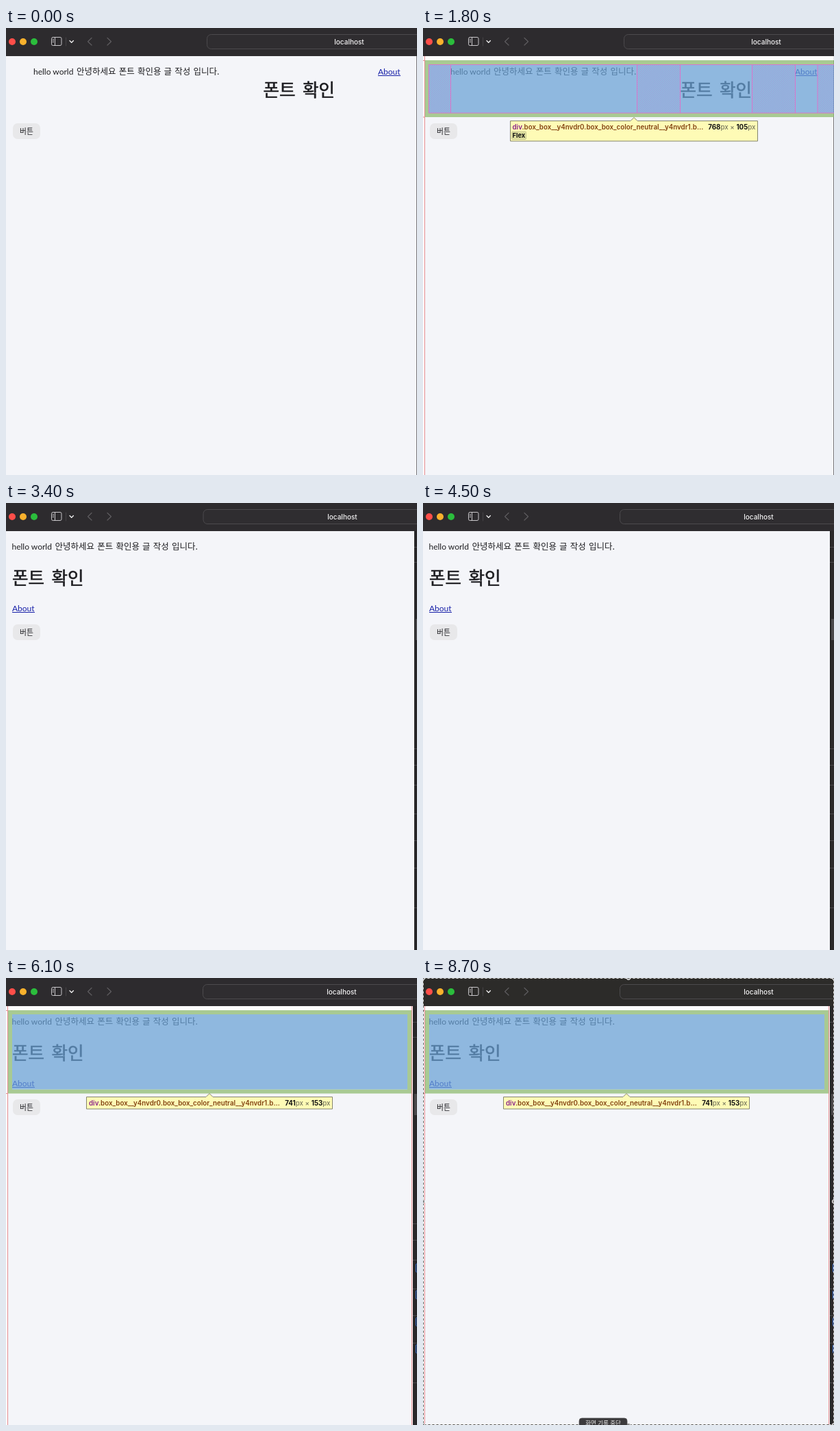
These frames come from a looping animation (600 by 652 pixels, 9 s). An HTML page:

```html
<!DOCTYPE html>
<html lang="ko">
<head>
<meta charset="utf-8">
<title>Responsive layout inspection</title>
<style>
  html, body { margin: 0; width: 100%; height: 100%; overflow: hidden; background: #f4f5f9; }
  svg { display: block; }
  .latin { font: 12px Lato, sans-serif; fill: #1d1d20; }
  .korean { font: 12.5px "Noto Sans CJK KR", "Noto Sans CJK", sans-serif; fill: #1d1d20; word-spacing: .7px; }
  .heading { font-size: 25.6px; stroke: #1d1d20; stroke-width: .6; }
  .small { font-size: 10.8px; }
  .link { fill: #1720a8; }
  .tip { font: 600 9.75px Inter, sans-serif; fill: #82400f; }
  .size { font-weight: 500; fill: #77775e; }
  .size tspan, .badge { font-weight: 700; fill: #111; }
  .badge { font-size: 9.3px; }
  .tag { fill: #8a2088; }
  .content { fill: rgb(104, 161, 214); fill-opacity: .72; }
  .padding { fill: rgb(143, 189, 114); fill-opacity: .75; }
  .margin { fill: #fff; fill-opacity: .8; }
  .guide { fill: none; stroke: #e58b90; }
  .bubble { fill: #fefbb6; stroke: #85856e; }
</style>
</head>
<body>
<svg width="600" height="652" viewBox="0 0 600 652">
  <defs>
    <pattern id="hatch" width="3" height="3" patternUnits="userSpaceOnUse">
      <path d="M0 3L3 0" stroke="#c56cc8" stroke-opacity=".42" stroke-width=".8"/>
    </pattern>
  </defs>
  <rect width="600" height="652" fill="#f4f5f9"/>

  <g id="wide">
    <text class="latin" x="40" y="67.5">hello world</text>
    <text class="korean" x="103" y="67.5">안녕하세요 폰트 확인용 글 작성 입니다.</text>
    <text class="korean heading" y="99.5"><tspan x="375.5">폰트</tspan><tspan x="433">확인</tspan></text>
    <text class="latin link" x="543" y="67.5">About</text>
    <path d="M543 69.5h33" stroke="#1720a8"/>
  </g>
  <g id="narrow">
    <text class="latin" x="8.5" y="67.5">hello world</text>
    <text class="korean" x="71.5" y="67.5">안녕하세요 폰트 확인용 글 작성 입니다.</text>
    <text class="korean heading" y="118.5"><tspan x="9">폰트</tspan><tspan x="66.5">확인</tspan></text>
    <text class="latin link" x="9" y="157.5">About</text>
    <path d="M9 159.5h33" stroke="#1720a8"/>
  </g>
  <g id="button">
    <rect x="10" y="139" width="40" height="23" rx="7" fill="#e8e8ea"/>
    <text class="korean small" x="30" y="154.5" text-anchor="middle">버튼</text>
  </g>
  <path id="edge" d="M599.5 41V652" stroke="#77767a"/>

  <g id="wideOverlay">
    <path class="margin" d="M0 41H600V47H3V652H0Z"/>
    <path class="padding" fill-rule="evenodd" d="M3 47H615V130H3ZM9 53H609V124H9Z"/>
    <rect class="content" x="9" y="53" width="600" height="71"/>
    <path fill="url(#hatch)" d="M9 53H40V124H9ZM312 53H375V124H312ZM480 53H543V124H480ZM576 53H608V124H576Z"/>
    <path fill="none" stroke="#d876cb" d="M8.5 53.5H600M8.5 124H600M8.5 53V124M40.5 53V124M312.5 53V124M375.5 53V124M480.5 53V124M543.5 53V124M576 53V124"/>
    <path class="guide" d="M2.5 41V652M0 47.5H3M0 130H3"/>
    <path class="bubble" d="M127.5 135.5H303L308 130.5L313 135.5H488.5V165H127.5Z"/>
    <text class="tip" x="130.5" y="148"><tspan class="tag">div</tspan>.box_box__y4nvdr0.box_box_color_neutral__y4nvdr1.b…</text>
    <text class="tip size" x="485.5" y="148" text-anchor="end"><tspan>768</tspan>px × <tspan>105</tspan>px</text>
    <rect x="129.5" y="151" width="21" height="11.5" rx="1.5" fill="#dfe0a0" stroke="#b9ba88" stroke-width=".7"/>
    <text class="tip badge" x="130.5" y="160">Flex</text>
  </g>

  <g id="narrowOverlay">
    <path class="margin" d="M0 41H594V652H592V47H3V652H0Z"/>
    <path class="padding" fill-rule="evenodd" d="M3 47H592V168.5H3ZM9 53H586V162.5H9Z"/>
    <rect class="content" x="9" y="53" width="577" height="109.5"/>
    <path class="guide" d="M2.5 41V652M592.5 41V652M0 47.5H3M0 168.5H3"/>
    <path class="bubble" d="M117.5 173.5H292L297 168.5L302 173.5H476.5V191H117.5Z"/>
    <text class="tip" x="121" y="186"><tspan class="tag">div</tspan>.box_box__y4nvdr0.box_box_color_neutral__y4nvdr1.b…</text>
    <text class="tip size" x="473.5" y="186" text-anchor="end"><tspan>741</tspan>px × <tspan>153</tspan>px</text>
  </g>

  <g id="panel">
    <rect y="41" width="40" height="611" fill="#29282a"/>
    <path d="M.5 41V652" stroke="#19191a"/>
    <rect x="2" y="169" width="20" height="31" fill="#4a494c"/>
    <path d="M0 64.5H20M0 86.5H20M0 358.5H20M0 382.5H20M0 411.5H20M0 453.5H20M0 492.5H20M0 532.5H20M0 590.5H20" stroke="#48474a"/>
    <g id="marks" fill="none" stroke="#3c74d4"></g>
  </g>

  <rect id="bar" width="600" height="41"/>
  <g id="lights"></g>
  <g fill="none" stroke="#c9c7ca" stroke-linecap="round" stroke-linejoin="round">
    <rect x="66.5" y="13.5" width="14.5" height="12" rx="2"/>
    <path d="M71.5 14V25M68.3 16.5h1.2M68.3 18.5h1.2M68.3 20.5h1.2"/>
    <path d="M87.5 14V26" stroke="#454346"/>
    <path d="M93 18.5l2.7 2.7l2.7-2.7" stroke="#f0eff0" stroke-width="1.3"/>
    <path d="M125 14.5L119.5 19.7L125 25M148 14.5L153.5 19.7L148 25" stroke="#5e5c5f" stroke-width="1.2"/>
  </g>
  <rect id="address" y="9.5" width="430" height="21" rx="6" fill="#fff" fill-opacity=".01" stroke="#4c4a4d"/>
  <text id="host" y="23.7" text-anchor="middle" style="font: 500 10px Inter, sans-serif" fill="#f4f3f4">localhost</text>

  <g id="selection">
    <rect x=".5" y=".5" width="599" height="651" fill="none" stroke="#55534f"/>
    <rect x=".5" y=".5" width="599" height="651" fill="none" stroke="#e5e5e5" stroke-dasharray="3 3"/>
    <g id="handles" fill="#8b8b8b" stroke="#eee"></g>
  </g>
  <g id="stopLabel">
    <rect x="228" y="642" width="70" height="20" rx="4" fill="#3b3a3c" stroke="#555456" stroke-width=".7"/>
    <text class="korean" x="263" y="651.5" text-anchor="middle" style="font-size: 8.5px; word-spacing: 0; fill: #f2f2f2">화면 기록 중단</text>
  </g>
</svg>
<script>
const LOOP = 9000, STEP = 100;
const el = id => document.getElementById(id);
const clamp = v => Math.min(1, Math.max(0, v));
const show = (id, on) => { el(id).style.display = on ? "" : "none"; };
const circles = (points, r) => points.map(([x, y, fill]) =>
  `<circle cx="${x}" cy="${y}" r="${r}"${fill ? ` fill="${fill}"` : ""}/>`).join("");

el("lights").innerHTML = circles([[9, 20, "#ff4e49"], [25, 20, "#f9b12d"], [41, 20, "#2bbd3c"]], 5);
el("handles").innerHTML = circles([0, 300, 600].flatMap(x =>
  [0, 326, 652].filter(y => x !== 300 || y !== 326).map(y => [x, y])), 2.7);
el("marks").innerHTML = [417, 456, 495.5, 535].map(y =>
  `<rect x="4.5" y="${y}" width="12" height="12" rx="1"/>`).join("");

function setOpacity(id, value) {
  el(id).style.opacity = value;
  show(id, value > 0);
}

function draw(now) {
  const t = Math.floor(now % LOOP / STEP) * STEP;
  const narrow = t >= 2800;
  const drag = 1 - Math.pow(1 - clamp((t - 2700) / 900), 1.6);
  const edge = 617 - 23 * drag;
  const capturing = t >= 7200;

  show("wide", !narrow);
  show("narrow", narrow);
  el("button").setAttribute("transform", `translate(0 ${narrow ? 38 : 0})`);
  show("edge", edge > 600);
  el("panel").setAttribute("transform", `translate(${Math.round(edge)} 0)`);
  show("marks", t >= 5300);

  el("address").setAttribute("x", 287.5 + (edge - 594) * .26);
  el("host").setAttribute("x", 490 + (edge - 594) * .48);
  el("bar").setAttribute("fill", capturing ? "#2c2b29" : "#2d2b2e");

  setOpacity("wideOverlay", clamp((t - 400) / 170) * clamp((2000 - t) / 170));
  setOpacity("narrowOverlay", clamp((t - 5200) / 170));
  show("selection", capturing);
  show("stopLabel", t >= 8500);
}

const start = performance.now();
function tick() {
  draw(performance.now() - start);
  requestAnimationFrame(tick);
}
tick();
</script>
</body>
</html>
```
